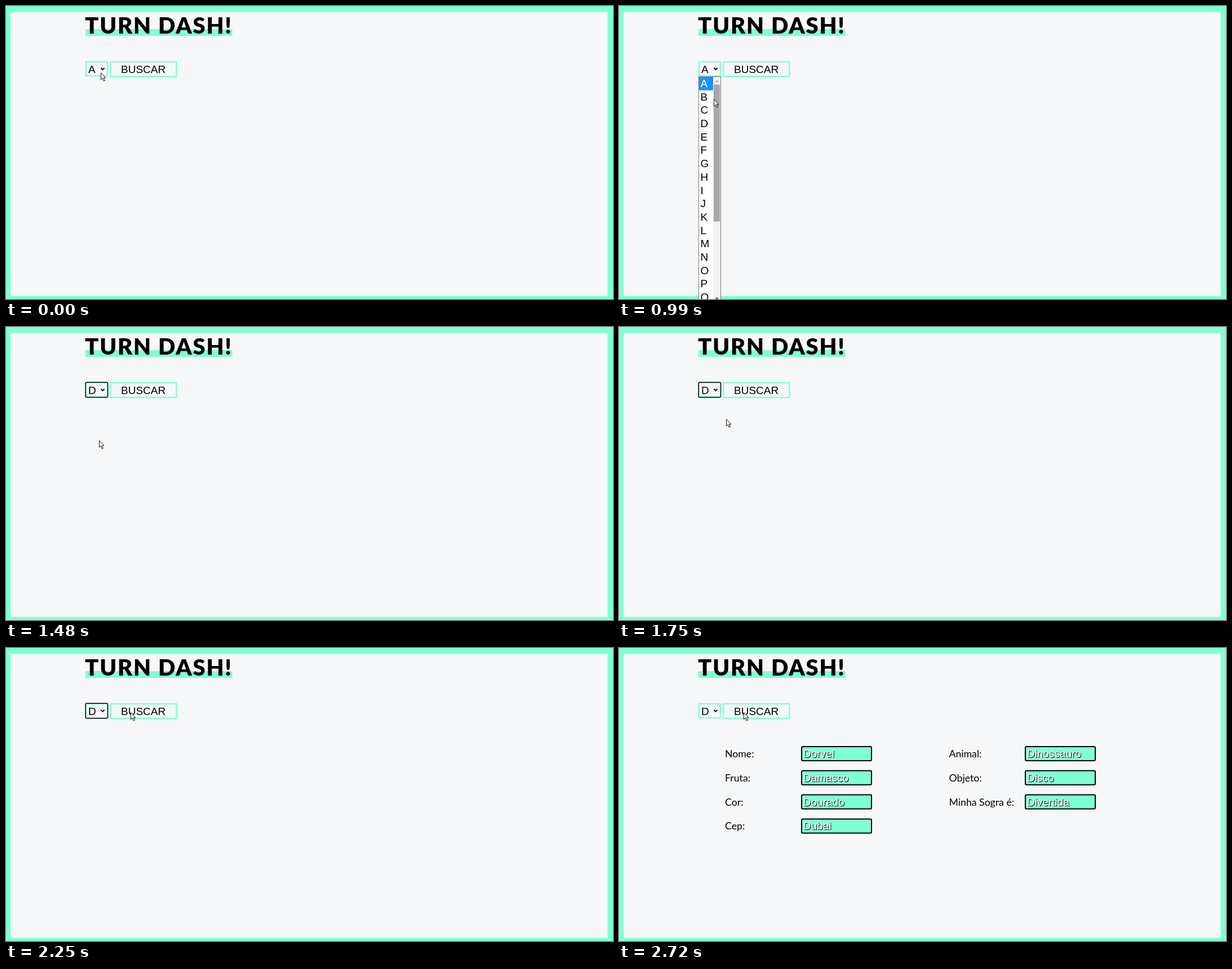
These frames come from a looping animation (1077 px wide and 520 px high, 3860 ms). An HTML page:

```html
<!DOCTYPE html>
<html lang="pt">
<head>
<meta charset="utf-8">
<title>Busca por letra</title>
<style>
  html, body { margin: 0; width: 100%; height: 100%; overflow: hidden; background: #7fffd4; }
  svg { display: block; }
  text { font: 19px "Liberation Sans", Arial, sans-serif; }
  .title { font: 900 40px Lato, sans-serif; letter-spacing: 1.8px; }
  .label { font: 17.7px Lato, sans-serif; }
  .value { fill: #fff; filter: drop-shadow(1.8px 1.8px 0 #000); }
  .box { fill: none; stroke: #7fffd4; stroke-width: 2.3; }
  .field { fill: #7fffd4; stroke: #000; stroke-width: 2; }
</style>
</head>
<body>
<svg width="1077" height="520" viewBox="0 0 1077 520">
  <rect x="8" y="10.4" width="1059.5" height="504.2" fill="#f5f7f9"/>
  <rect x="141" y="41" width="260.5" height="12" fill="#7fffd4"/>
  <text class="title" x="140" y="49">TURN DASH!</text>

  <rect class="box" x="142" y="99" width="38" height="25"/>
  <rect id="focus" x="141.2" y="98.2" width="39.4" height="26.6" rx="2" fill="none" stroke="#000" stroke-width="1.5"/>
  <text id="chosen" x="146" y="119"></text>
  <path d="M168.4 110l3.1 3 3.1-3" fill="none" stroke="#000" stroke-width="1.8"/>
  <rect class="box" x="185.3" y="99" width="117" height="26"/>
  <text x="204" y="119">BUSCAR</text>

  <g id="results"></g>

  <g id="menu">
    <rect x="141.5" y="125.5" width="39" height="420" fill="#fff" stroke="#777"/>
    <rect id="hover" x="142" width="25" height="23.7" fill="#1e90ff"/>
    <g id="options"></g>
    <rect x="167" y="126" width="13" height="394" fill="#f1f1f1"/>
    <rect id="thumb" x="168" y="139.5" width="11" height="243"/>
    <path d="M170.3 135l3.2-3.5 3.2 3.5z" fill="#a3a3a3"/>
    <path d="M170.3 517.5h6.4l-3.2 3.5z" fill="#505050"/>
  </g>

  <g id="cursor">
    <circle id="click" cx="-.5" cy=".5" r="9.3" fill="#ffee4a" opacity=".8"/>
    <path d="M-.5.5v12.2l2.8-2.5 2.1 4.9 2-.9-2.1-4.6h3.6z" fill="#fff" stroke="#111"/>
  </g>
</svg>
<script>
const LOOP = 3860, STEP = 68.8, ROW = 23.69, MENU_TOP = 126;
const OPEN = 720, PICK = 1400, CLOSE = 1470, PRESS = 2650, RESULT = 2720;
const $ = id => document.getElementById(id);
const show = (id, on) => $(id).setAttribute("visibility", on ? "visible" : "hidden");

// time, x, y of the pointer tip
const path = [
  [0, 169, 118], [719, 169, 118], [720, 169, 117], [995, 169, 165],
  [1270, 166, 201], [CLOSE, 166, 201], [1750, 191, 163],
  [1821, 191, 163], [2230, 222, 114], [LOOP, 222, 114]
];

const letters = [..."ABCDEFGHIJKLMNOPQ"];
$("options").innerHTML = letters.map((c, i) =>
  `<text x="144.5" y="${144 + i * ROW}">${c}</text>`).join("");
const options = [...$("options").children];

const column = (x, fieldX, rows) => rows.map(([label, value], i) => {
  const y = 175 + i * 42.8;
  return `<text class="label" x="${x}" y="${y + 19}">${label}</text>
    <rect class="field" x="${fieldX}" y="${y}" width="124" height="25" rx="2"/>
    <text class="value" x="${fieldX + 3}" y="${y + 19}">${value}</text>`;
}).join("");
$("results").innerHTML =
  column(188, 324, [["Nome:", "Dorvel"], ["Fruta:", "Damasco"], ["Cor:", "Dourado"], ["Cep:", "Dubai"]]) +
  column(585.5, 721, [["Animal:", "Dinossauro"], ["Objeto:", "Disco"], ["Minha Sogra é:", "Divertida"]]);

function pointer(t) {
  const i = path.findIndex(p => p[0] > t);
  const [t0, x0, y0] = path[i - 1], [t1, x1, y1] = path[i];
  let k = (t - t0) / (t1 - t0);
  if (t0 >= CLOSE) k = k * k * (3 - 2 * k);
  return [x0 + (x1 - x0) * k, y0 + (y1 - y0) * k];
}

function draw(t) {
  const n = Math.floor((t - OPEN + 6) / STEP);
  const [x, y] = pointer(t < OPEN ? 0 : Math.min(OPEN + n * STEP, LOOP - 1));
  $("cursor").setAttribute("transform", `translate(${Math.round(x)} ${Math.round(y)})`);

  const open = t >= OPEN && t < CLOSE, overList = x < 167.5;
  const row = overList ? Math.floor((y - MENU_TOP) / ROW) : 0;
  show("menu", open);
  $("hover").setAttribute("y", MENU_TOP + row * ROW);
  options.forEach((o, i) => o.setAttribute("fill", i === row ? "#fff" : "#000"));
  $("thumb").setAttribute("fill", !overList && y > 139 ? "#a8a8a8" : "#c1c1c1");

  $("chosen").textContent = t < CLOSE ? "A" : "D";
  show("focus", t >= CLOSE && t < PRESS);
  show("results", t >= RESULT);
  show("click", [[OPEN, 790], [PICK, CLOSE], [PRESS, RESULT]].some(([a, b]) => t >= a && t < b));
}

const start = performance.now();
function tick() {
  draw((performance.now() - start) % LOOP);
  requestAnimationFrame(tick);
}
tick();
</script>
</body>
</html>
```
